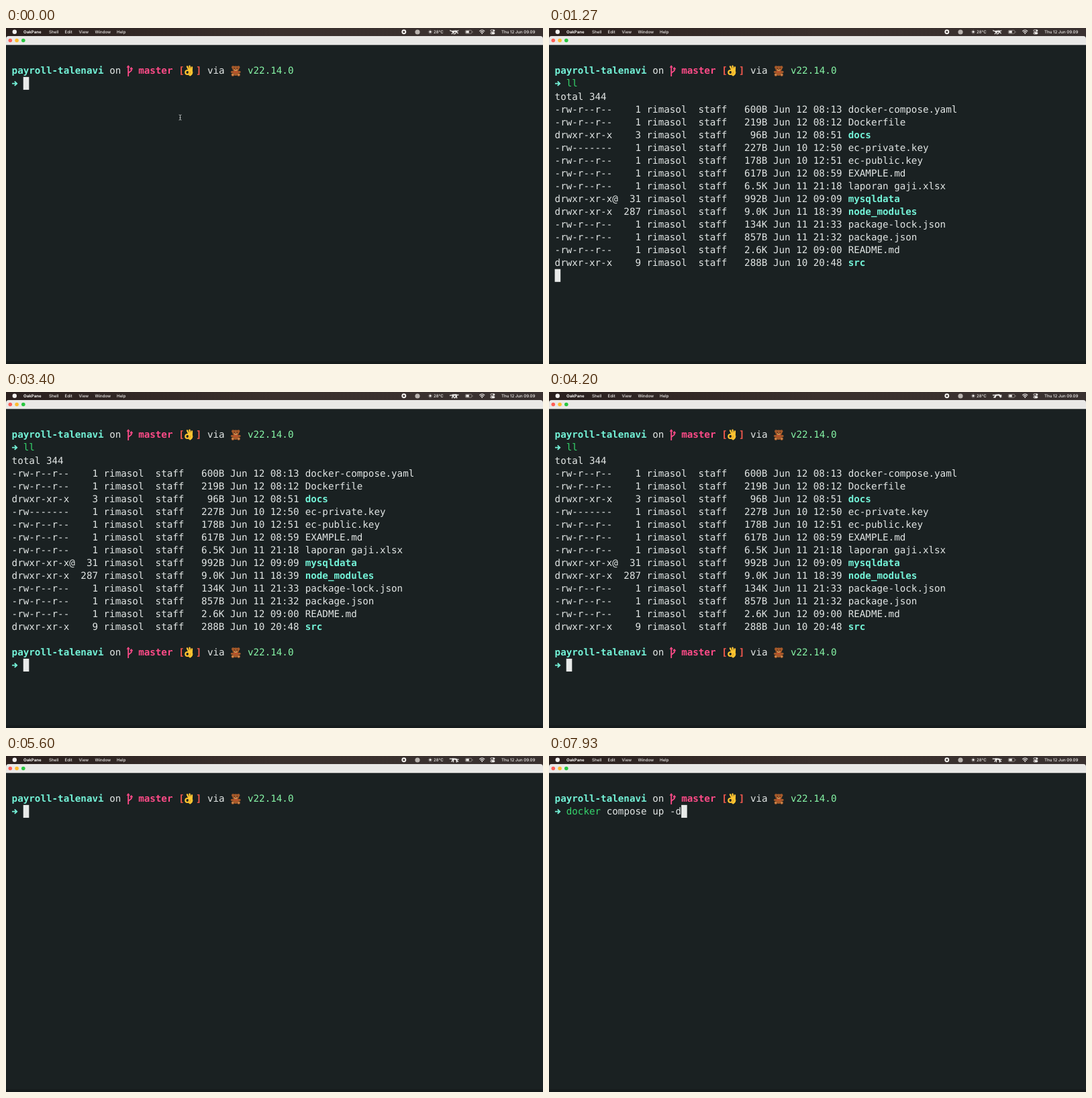
Write an HTML page that moves like this. It is 800 px wide and 500 px high and loops after 8000 ms.

```html
<!DOCTYPE html>
<html lang="en">
<head>
<meta charset="utf-8">
<title>Terminal session</title>
<style>
  html, body { margin: 0; width: 100%; height: 100%; overflow: hidden; background: #1a2122; }
  svg { display: block; width: 800px; height: 500px; }
  text { white-space: pre; text-rendering: geometricPrecision; }
  .mono { font: 14.235px "DejaVu Sans Mono", monospace; font-variant-ligatures: none; }
  .bold { font-weight: 700; }
  .menu { font: 500 6.1px Inter, sans-serif; fill: #f3f0ee; }
</style>
</head>
<body>
<svg viewBox="0 0 800 500">
  <defs>
    <linearGradient id="bar">
      <stop offset="0" stop-color="#2a201e"/>
      <stop offset=".5" stop-color="#3a302d"/>
      <stop offset="1" stop-color="#393130"/>
    </linearGradient>
    <g id="branch" fill="none" stroke="#ff4b88" stroke-width="1.8">
      <path d="M2.2 2.5V18.2M2.2 13.2L6.8 9.6V5.6"/>
      <path d="M.3 5L2.2 2.6L4.1 5M4.9 7.6L6.8 5.2L8.7 7.6" stroke-width="1.3"/>
    </g>
    <g id="okay" stroke="#ffc531" fill="none" stroke-linecap="round">
      <path d="M4.3 3.6L7.2 9.5M7.8 2.9L9.2 9.5M11.2 4.6L11 10" stroke-width="2.4"/>
      <path d="M7.2 10.2Q12.6 8.6 12.2 12.6Q11.6 16.4 8.4 17.4L6.6 16Z" fill="#ffc531" stroke-width="1"/>
      <circle cx="4.6" cy="12.2" r="3" stroke-width="2.2"/>
      <path d="M8.6 11.4Q9.4 13.6 7.4 15" stroke="#d88a1c" stroke-width=".8"/>
    </g>
    <g id="teddy" fill="#a65a2a">
      <circle cx="4" cy="4.6" r="2.2"/><circle cx="12" cy="4.6" r="2.2"/>
      <ellipse cx="8" cy="7" rx="5" ry="4.2"/>
      <ellipse cx="8" cy="13" rx="4.4" ry="4.2"/>
      <ellipse cx="2.8" cy="11.6" rx="2.2" ry="1.7"/><ellipse cx="13.2" cy="11.6" rx="2.2" ry="1.7"/>
      <circle cx="3.6" cy="15.8" r="2.3"/><circle cx="12.4" cy="15.8" r="2.3"/>
      <g fill="#d99a5b">
        <ellipse cx="8" cy="8.6" rx="2.2" ry="1.6"/>
        <circle cx="3.6" cy="15.8" r="1.2"/><circle cx="12.4" cy="15.8" r="1.2"/>
      </g>
      <path d="M8 11.6L5.4 10.4V12.8ZM8 11.6L10.6 10.4V12.8Z" fill="#d8432f"/>
      <g fill="#2c1710">
        <circle cx="6" cy="6.2" r=".7"/><circle cx="10" cy="6.2" r=".7"/><circle cx="8" cy="8" r=".8"/>
      </g>
    </g>
  </defs>

  <rect width="800" height="500" fill="#1a2122"/>
  <rect y="496" width="800" height="4" fill="#151b1c"/>
  <rect width="800" height="16" fill="url(#bar)"/>
  <path d="M0 25.3V16Q0 12 4 12H796Q800 12 800 16V25.3Z" fill="#e9e8e6"/>
  <circle cx="6.3" cy="18.5" r="2.8" fill="#ff5f57"/>
  <circle cx="16.1" cy="18.5" r="2.8" fill="#febc2e"/>
  <circle cx="25.8" cy="18.5" r="2.8" fill="#28c840"/>

  <g id="menu" class="menu"></g>
  <circle cx="12.8" cy="5.8" r="3.2" fill="#f3f0ee"/>
  <circle cx="592.8" cy="5.8" r="2.5" fill="#3a302d" stroke="#f6f4f2" stroke-width="1.9"/>
  <circle cx="613" cy="6" r="3.6" fill="#b9b3af"/>
  <g stroke="#f3f0ee" fill="none" stroke-width=".7">
    <circle cx="632" cy="5.8" r="1.3" fill="#f3f0ee"/>
    <circle cx="632" cy="5.8" r="2.7" stroke-dasharray=".7 1.42"/>
    <rect x="684.3" y="3.4" width="9.6" height="4.9" rx="1.4" stroke="#a39d99"/>
    <path d="M695 5V6.8" stroke="#a39d99"/>
    <path d="M685.3 5.85H689.8" stroke-width="3.3"/>
    <path d="M705.2 4.8Q709.2 1.2 713.2 4.8M706.7 6.5Q709.2 4.2 711.7 6.5" stroke-width="1.1"/>
    <path d="M707.8 7.6Q709.2 6.5 710.6 7.6L709.2 9.2Z" fill="#f3f0ee" stroke="none"/>
    <rect x="721.8" y="2.7" width="6.2" height="2.5" rx="1.25"/>
    <rect x="721.8" y="6.5" width="6.2" height="2.5" rx="1.25" fill="#f3f0ee"/>
    <circle cx="726.7" cy="3.95" r="1" fill="#f3f0ee"/>
    <circle cx="723.1" cy="7.75" r=".8" fill="#3a302d" stroke="none"/>
  </g>
  <path id="cat" fill="none" stroke="#f6f4f2" stroke-linecap="round" stroke-linejoin="round" stroke-width="1.3"/>

  <g id="screen" class="mono"></g>
  <path id="pointer" d="M257.6 129.2Q259.5 129.2 259.5 130.6Q259.5 129.2 261.4 129.2M259.5 130.4V135.6M257.6 137Q259.5 137 259.5 135.4Q259.5 137 261.4 137M258.4 133.4H260.6"
        fill="none" stroke="#c3c8c8" stroke-width=".9"/>
</svg>
<script>
const DURATION = 8000;
const CELL = 8.57, LINE = 19.06, LEFT = 8.6, TOP = 53.8, BASE = 14.6;
const color = {
  text: '#e2e6e5', cyan: '#74f3d8', pink: '#ff4b88', red: '#f4594f',
  green: '#35d56c', mint: '#86f5a6', ghost: '#7b898b', dark: '#1a2122', cursor: '#e8eae9'
};
const byId = id => document.getElementById(id);
const colX = col => LEFT + col * CELL;
const rowY = row => TOP + row * LINE;

function add(parent, tag, attrs, content = '') {
  const node = document.createElementNS('http://www.w3.org/2000/svg', tag);
  for (const key in attrs) node.setAttribute(key, attrs[key]);
  node.textContent = content;
  parent.appendChild(node);
  return node;
}

function put(parent, row, col, content, fill = color.text, bold = false) {
  if (!content.trim()) return;
  const indent = content.length - content.trimStart().length;
  add(parent, 'text', {
    x: colX(col + indent), y: rowY(row) + BASE, fill, class: bold ? 'bold' : ''
  }, content.trim());
}

// Menu bar
[[26, 'OakPane', 700], [64, 'Shell'], [87.6, 'Edit'], [108.6, 'View'], [132.4, 'Window'], [165, 'Help'],
 [637, '28°C'], [738, 'Thu 12 Jun 09.09']].forEach(([x, label, weight = 500]) =>
  add(byId('menu'), 'text', { x, y: 7.9, 'font-weight': weight }, label));

// Terminal contents
const screen = byId('screen');
const layer = () => add(screen, 'g', {});

function prompt(parent, row) {
  put(parent, row, 0, 'payroll-talenavi', color.cyan, true);
  put(parent, row, 17, 'on');
  put(parent, row, 22, 'master', color.pink, true);
  put(parent, row, 29, '[', color.red, true);
  put(parent, row, 32, ']', color.red, true);
  put(parent, row, 34, 'via');
  put(parent, row, 41, 'v22.14.0', color.mint);
  [['branch', 20], ['okay', 30], ['teddy', 38]].forEach(([icon, col]) =>
    add(parent, 'use', { href: '#' + icon, x: colX(col), y: rowY(row) }));
  const y = rowY(row + 1) + 9.8;
  add(parent, 'path', {
    d: `M9 ${y}H16M12.8 ${y - 3.2}L16.2 ${y}L12.8 ${y + 3.2}`,
    fill: 'none', stroke: color.cyan, 'stroke-width': 1.8
  });
}

const files = `-rw-r--r--|1|600B|12 08:13|docker-compose.yaml
-rw-r--r--|1|219B|12 08:12|Dockerfile
drwxr-xr-x|3|96B|12 08:51|docs
-rw-------|1|227B|10 12:50|ec-private.key
-rw-r--r--|1|178B|10 12:51|ec-public.key
-rw-r--r--|1|617B|12 08:59|EXAMPLE.md
-rw-r--r--|1|6.5K|11 21:18|laporan gaji.xlsx
drwxr-xr-x@|31|992B|12 09:09|mysqldata
drwxr-xr-x|287|9.0K|11 18:39|node_modules
-rw-r--r--|1|134K|11 21:33|package-lock.json
-rw-r--r--|1|857B|11 21:32|package.json
-rw-r--r--|1|2.6K|12 09:00|README.md
drwxr-xr-x|9|288B|10 20:48|src`.split('\n').map(line => line.split('|'));

prompt(layer(), 0);
const listing = layer();
put(listing, 1, 2, 'll', color.green);
put(listing, 2, 0, 'total 344');
files.forEach(([mode, links, size, date, name], i) => {
  const row = i + 3, isDir = mode[0] === 'd';
  put(listing, row, 0,
    `${mode.padEnd(11)} ${links.padStart(3)} rimasol  staff   ${size.padStart(4)} Jun ${date}`);
  put(listing, row, 51, name, isDir ? color.cyan : color.text, isDir);
});
const nextPrompt = layer();
prompt(nextPrompt, 17);
const input = layer();

// Input line with syntax colours, suggestion and block cursor
const commands = ['ll', 'clear', 'docker'];
const history = ['ll', 'clear', 'docker compose down', 'docker compose up -d'];

function drawInput(row, col, typed) {
  input.replaceChildren();
  const [word] = typed.split(' ');
  const suggestion = typed && history.find(line => line.startsWith(typed)) || '';
  const ghost = suggestion.slice(typed.length);
  const end = col + typed.length;
  put(input, row, col, word, commands.includes(word) ? color.green : color.red);
  put(input, row, col + word.length, typed.slice(word.length));
  add(input, 'rect', { x: colX(end), y: rowY(row), width: CELL, height: LINE, fill: color.cursor });
  put(input, row, end, ghost.slice(0, 1), color.dark);
  put(input, row, end + 1, ghost.slice(1), color.ghost);
}

// Each step: start time, view, typed text
const typing = (view, line, from, times) =>
  times.map((time, i) => [time, view, line.slice(0, from + i + 1)]);
const steps = [
  [0, 'empty', ''],
  ...typing('empty', 'll', 0, [870, 1000]),
  [1200, 'running', ''],
  [1330, 'listed', ''],
  ...typing('listed', 'clear', 0, [4530, 4660, 4790, 4900, 5060]),
  [5230, 'empty', ''],
  ...typing('empty', 'docker compos', 0, Array.from({ length: 13 }, (_, i) => 5860 + i * 65)),
  ...typing('empty', 'docker compose up -d', 13, [6720, 6800, 6930, 7000, 7130, 7260, 7390])
];
const cursorAt = { empty: [1, 2], running: [16, 0], listed: [18, 2] };
const show = (node, on) => node.setAttribute('visibility', on ? 'visible' : 'hidden');

// Running cat: body, head, tail, legs
const STRIDE = 580;
const poses = [
  'M665 5.4L671 4.8L673.8 4M665 4.6L671 4.2M665 5L661.6 3.8M666 6L664.4 8.8M667 6L667.6 9M670.6 5.6L669.4 8.6M671 5.4L673.2 7.8',
  'M665 5L671 4.6L674 5M665 4.4L671 4M665 4.6L661.4 4.6M665.6 5.4L662.8 8M666 5.4L664.4 8.4M671 5L674 7.2M670.6 5L672.6 8',
  'M665 4.4L671 5.2L674.6 6.2M665 3.8L671 4.6M665 4L661.2 2.8M665 4.8L661.6 7.2M665.6 5L663 7.6M671 5.8L675 8.4M670.4 5.8L673.6 8.8',
  'M665 4.6L671 5L674 5.2M665 4L671 4.4M665 4.4L661.2 4.2M665.6 5.4L664 8.2M666.6 5.6L666.4 8.8M671 5.6L671.4 9M670.4 5.6L673.4 8.2',
  'M665 5L671 4.6L674 4.4M665 4.2L671 4M665 4.6L661.4 5.2M666 5.6L667.8 8.8M665.6 5.6L664.6 8.8M670.6 5.6L669 8.8M671 5.4L671.6 8.8'
];

let current = -1;
function frame(now) {
  const t = now % DURATION;
  const index = steps.findLastIndex(([time]) => time <= t);
  if (index !== current) {
    current = index;
    const [, view, typed] = steps[index];
    show(listing, view !== 'empty');
    show(nextPrompt, view === 'listed');
    show(byId('pointer'), index === 0);
    drawInput(...cursorAt[view], typed);
  }
  byId('cat').setAttribute('d', poses[Math.floor(t % STRIDE / STRIDE * poses.length)]);
  requestAnimationFrame(frame);
}
frame(performance.now());
</script>
</body>
</html>
```
